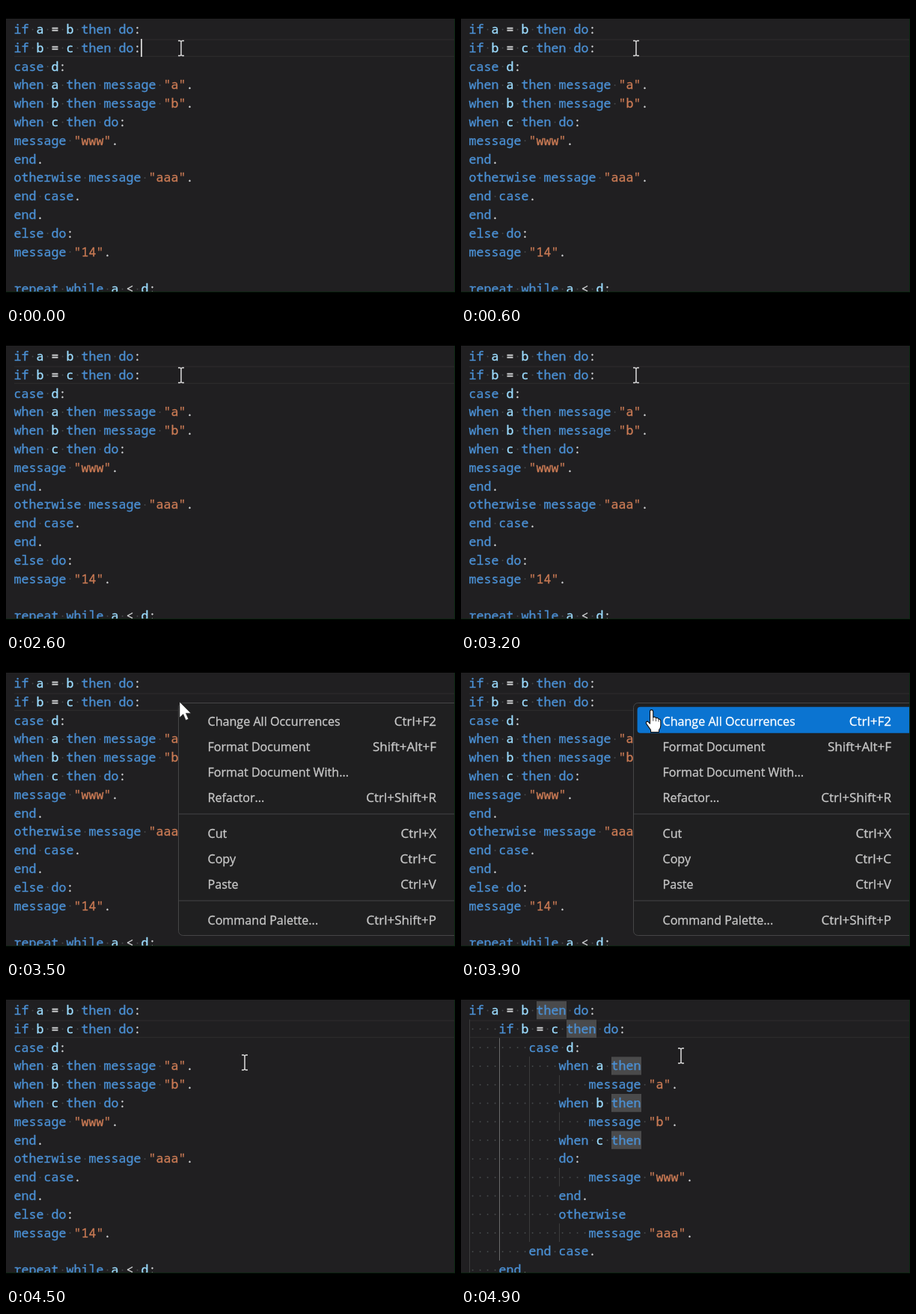
Recreate the animation shown at these times as an HTML page. Size 600x400 px, loop 5000 ms.

```html
<!DOCTYPE html>
<html lang="en">
<head>
<meta charset="utf-8">
<style>
  html, body { margin: 0; width: 100%; height: 100%; overflow: hidden; background: #000; }
  svg { display: block; width: 100vw; height: 100vh; }
  text { white-space: pre; fill: currentColor; stroke: currentColor; stroke-width: 0.3; }
  .code text { font: 500 16.667px "Noto Sans Mono", "DejaVu Sans Mono", monospace; }
  .menu text { font: 16.1px "Open Sans", "Noto Sans", sans-serif; color: #c8c8c8; }
  .menu .keys { font-size: 17px; text-anchor: end; }
  .menu .on text { color: #fff; }
  .menu .bar { visibility: hidden; }
  .menu .on .bar { visibility: visible; }
</style>
</head>
<body>
<svg id="stage" viewBox="0 0 600 400" preserveAspectRatio="none"></svg>
<script>
const NS = 'http://www.w3.org/2000/svg';
const stage = document.getElementById('stage');
const LOOP = 5000, STEP = 100;
const LEFT = 11, CELL = 10, TOP = 18.7, ROW = 24.8;
const CARET_FLIP = 1000, CARET_START = 600;
const MENU_OPEN = 3500, MENU_CLOSE = 4500, FORMATTED = 4700, WORDS_LIT = 4900;
const ITEM_UP = 19.2, ITEM_HEIGHT = 35;

const COLORS = { word: '#4b90d4', name: '#9cdcfe', text: '#cb7b55', mark: '#d0d2d4' };

const before = `if a = b then do:
if b = c then do:
case d:
when a then message "a".
when b then message "b".
when c then do:
message "www".
end.
otherwise message "aaa".
end case.
end.
else do:
message "14".

repeat while a < d:`;

const after = `if a = b then do:
    if b = c then do:
        case d:
            when a then
                message "a".
            when b then
                message "b".
            when c then
            do:
                message "www".
            end.
            otherwise
                message "aaa".
        end case.
    end.`;

function add(parent, tag, attrs = {}, content = '') {
  const el = document.createElementNS(NS, tag);
  for (const key in attrs) el.setAttribute(key, attrs[key]);
  el.textContent = content;
  parent.appendChild(el);
  return el;
}

const rect = (parent, x, y, width, height, fill, more = {}) =>
  add(parent, 'rect', { x, y, width, height, fill, ...more });
const group = (parent, cls = '') => add(parent, 'g', { class: cls });
const show = (el, on) => el.setAttribute('visibility', on ? 'visible' : 'hidden');
const colX = col => LEFT + col * CELL;
const rowY = row => TOP + row * ROW;

function kind(token) {
  if (token[0] === '"') return 'text';
  if (/^[a-d]$/.test(token)) return 'name';
  return /^\w/.test(token) ? 'word' : 'mark';
}

function drawCode(parent, source) {
  source.split('\n').forEach((line, row) => {
    for (const m of line.matchAll(/"\w*"|\w+|\S| /g)) {
      const x = colX(m.index);
      if (m[0] === ' ') {
        add(parent, 'circle', { cx: x + 4.6, cy: rowY(row) + 12.8, r: 1, fill: '#444749' });
      } else {
        add(parent, 'text', { x: x - 0.5, y: rowY(row) + 18.3, color: COLORS[kind(m[0])] }, m[0]);
      }
    }
  });
}

function guide(parent, col, first, last, fill) {
  rect(parent, colX(col), rowY(first), 1, (last - first + 1) * ROW, fill);
}

// Editor
rect(stage, 0, 17, 600, 366, '#201f21');
rect(stage, LEFT, 44.4, 589, 1.2, '#2b2a2c');
rect(stage, LEFT, 66.8, 589, 1.2, '#2b2a2c');

const plain = group(stage, 'code');
drawCode(plain, before);

const tidy = group(stage, 'code');
const lit = group(tidy);
[[0, 9], [1, 13], [3, 19], [5, 19], [7, 19]].forEach(([row, col]) =>
  rect(lit, colX(col), rowY(row) + 0.3, 40, 24.2, '#4a4a4b'));
guide(tidy, 0, 1, 14, '#3b3b3c');
guide(tidy, 4, 2, 13, '#6a6a6b');
guide(tidy, 8, 3, 12, '#3b3b3c');
[4, 6, 9, 12].forEach(row => guide(tidy, 12, row, row, '#3b3b3c'));
drawCode(tidy, after);

const caret = rect(stage, 180, 44, 2, 24, '#c4c4c4');

// Context menu
const menu = group(stage, 'menu');
rect(menu, 230.5, 57.5, 390, 311, '#1f1f20', { rx: 6, stroke: '#454546' });
[206, 322].forEach(y => rect(menu, 231, y - 0.5, 369, 1, '#454546'));
const items = [
  [82, 'Change All Occurrences', 'Ctrl+F2'],
  [116, 'Format Document', 'Shift+Alt+F'],
  [150, 'Format Document With...', ''],
  [184, 'Refactor...', 'Ctrl+Shift+R'],
  [232, 'Cut', 'Ctrl+X'],
  [266, 'Copy', 'Ctrl+C'],
  [300, 'Paste', 'Ctrl+V'],
  [348, 'Command Palette...', 'Ctrl+Shift+P']
].map(([y, label, keys]) => {
  const el = group(menu);
  rect(el, 235.6, y - ITEM_UP, 380, ITEM_HEIGHT, '#0b74d1', { class: 'bar', rx: 4 });
  add(el, 'text', { x: 269.5, y: y + 5.8 }, label);
  add(el, 'text', { x: 575, y: y + 5.8, class: 'keys' }, keys);
  return { el, top: y - ITEM_UP };
});

// Pointers, each with its hot spot at the origin
const beam = group(stage);
add(beam, 'path', {
  d: 'M-4 -10H-1.5L0 -9L1.5 -10H4M0 -9V9M-4 10H-1.5L0 9L1.5 10H4',
  fill: 'none', stroke: '#dedede', 'stroke-width': 1.5
});
const arrow = add(stage, 'path', {
  d: 'M0 0V21L4.8 16.5L8.3 24.5L11.8 23L8.4 15.2H15Z',
  fill: '#fff', stroke: '#222', 'stroke-width': 0.6
});
const hand = group(stage);
add(hand, 'path', {
  d: 'M-2 1.5Q-2 -1 0 -1T2.2 1.5V9Q4.5 7.5 6 10Q8.5 9 9.4 11.5Q12.3 11 12.3 14V20Q12.3 23 10 26V29H-1V26L-7 17.5Q-7.8 14.5 -5 14.5L-2 17.5Z',
  fill: '#fff', stroke: '#111', 'stroke-width': 1.1, 'stroke-linejoin': 'round'
});
add(hand, 'path', { d: 'M2.2 9V14M6 10.5V14.5M9.4 12V15', stroke: '#333', 'stroke-width': 0.9 });

// Letterbox and thin edge
rect(stage, 599, 17, 1, 366, '#0c2a12');
rect(stage, 0, 382, 600, 1, '#0c2410');
rect(stage, 0, 0, 600, 17, '#000');
rect(stage, 0, 383, 600, 17, '#000');

const ease = p => p * p * (3 - 2 * p);
const path = [[0, 234, 56.5], [3400, 234, 56.5], [3500, 232, 56], [3700, 232, 56],
  [4300, 319, 101], [4700, 319, 101], [4900, 294, 92], [LOOP, 294, 92]];

function pointerAt(t) {
  const i = path.findIndex((p, n) => n > 0 && t <= p[0]);
  const [t0, x0, y0] = path[i - 1], [t1, x1, y1] = path[i];
  const p = ease((t - t0) / (t1 - t0));
  return [x0 + (x1 - x0) * p, y0 + (y1 - y0) * p];
}

function draw(now) {
  const t = Math.floor((now % LOOP) / STEP) * STEP;
  const open = t >= MENU_OPEN && t < MENU_CLOSE;
  const done = t >= FORMATTED;
  const [x, y] = pointerAt(t);
  const hovered = open && items.findLast(item => y >= item.top);

  show(plain, !done);
  show(tidy, done);
  lit.style.display = t >= WORDS_LIT ? '' : 'none';
  const flips = Math.floor((t - CARET_START) / CARET_FLIP) + 1;
  show(caret, t < MENU_OPEN && flips % 2 === 0);

  menu.style.display = open ? '' : 'none';
  items.forEach(item => item.el.classList.toggle('on', item === hovered));

  [[beam, !open], [arrow, open && !hovered], [hand, hovered]].forEach(([el, on]) => {
    show(el, on);
    el.setAttribute('transform', `translate(${x} ${y})`);
  });
}

const start = performance.now();
function tick() {
  draw(performance.now() - start);
  requestAnimationFrame(tick);
}
tick();
</script>
</body>
</html>
```
